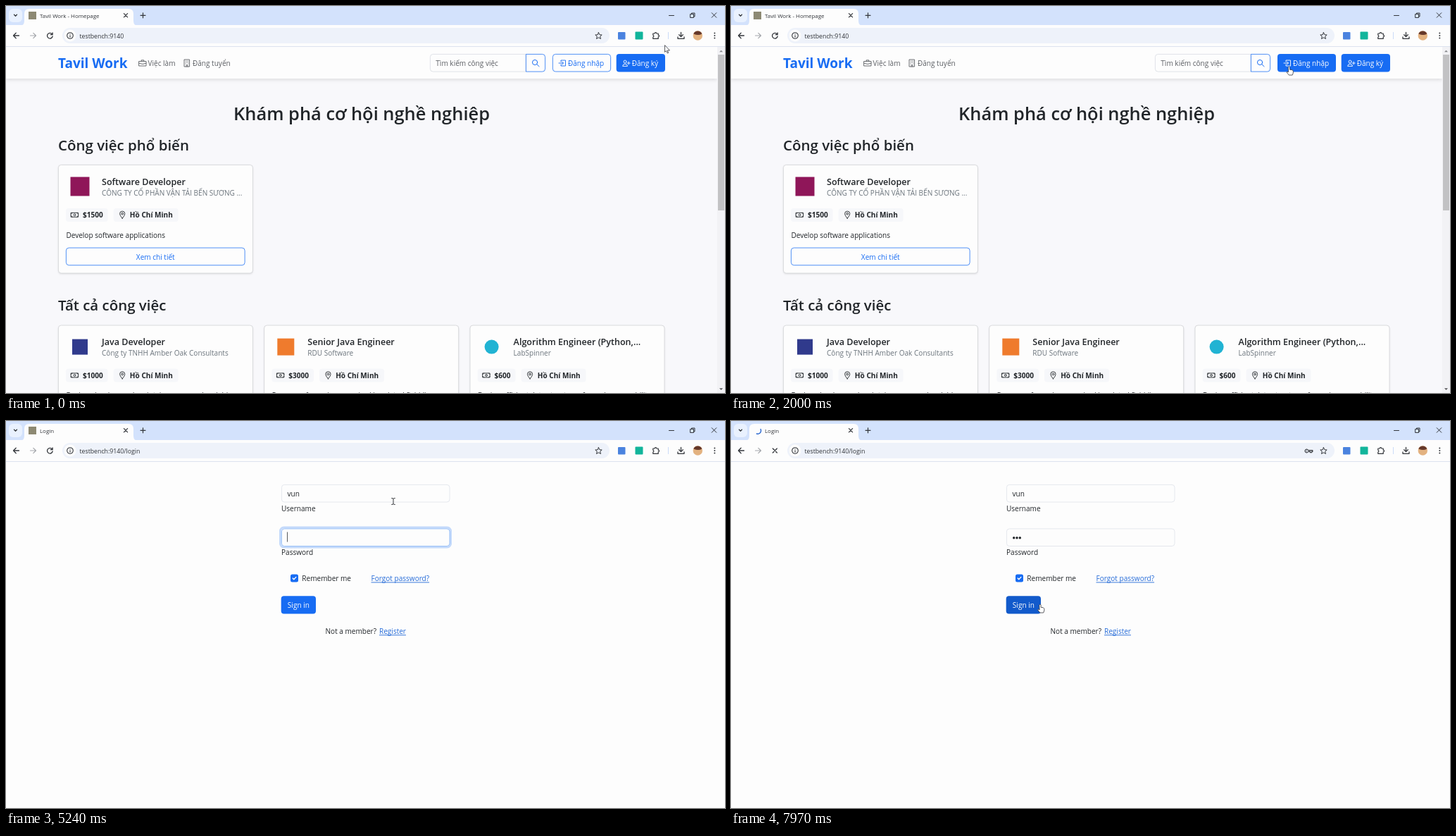
Recreate the animation shown at these times as an HTML page with a canvas. Size 1021x549 px, loop 8 s.

```html
<!DOCTYPE html>
<html lang="vi">
<head>
<meta charset="utf-8">
<title>Job board</title>
<style>
html, body { margin: 0; width: 100%; height: 100%; overflow: hidden; background: #fdfdfd; }
canvas { display: block; width: 1021px; height: 549px; }
</style>
</head>
<body>
<canvas id="stage" width="1021" height="549"></canvas>
<script>
const ctx = document.getElementById('stage').getContext('2d');
const LOOP = 8000;
const INK = '#212529', GREY = '#6c757d', BLUE = '#176cf3', WHITE = '#fdfdfd', CHROME = '#33363b';
const BODY = 10.67, BTN_H = 25.4, HAIR = 0.75;
const FACE = '"Open Sans", "Noto Sans", sans-serif';
const BRAND = 'Tavil Work', HOST = 'testbench:9140', USER = 'vun';

// Key moments, in ms
const LOGIN_LOAD = 2350, FOCUS_USER = 3350, FOCUS_PASS = 4800, PRESS = 7720, SUBMIT = 7800;
const USER_KEYS = [3800, 4050, 4300];
const PASS_KEYS = [5750, 5950, 6150];
const POINTER = [
  [0, 935.5, 56], [120, 935.5, 56], [950, 679.5, 223], [1380, 679.5, 223],
  [1920, 792.5, 86], [2400, 792.5, 86], [2780, 551, 116], [3100, 551, 116],
  [3300, 550, 114], [6280, 550, 114], [6850, 439.5, 259], [7550, 439.5, 259], [7700, 439, 260]
];

function text(s, x, y, o = {}) {
  const { size = BODY, weight = 400, color = INK, align = 'left' } = o;
  ctx.font = `${weight} ${size * 0.942}px ${FACE}`;
  ctx.fillStyle = color;
  ctx.textAlign = align;
  ctx.fillText(s, x, y);
  return ctx.measureText(s).width;
}

function box(x, y, w, h, r, fill, line, width = HAIR) {
  ctx.beginPath();
  ctx.roundRect(x, y, w, h, r);
  if (fill) { ctx.fillStyle = fill; ctx.fill(); }
  if (line) { ctx.strokeStyle = line; ctx.lineWidth = width; ctx.stroke(); }
}

function disc(x, y, r, color) {
  ctx.beginPath();
  ctx.arc(x, y, r, 0, 7);
  ctx.fillStyle = color;
  ctx.fill();
}

// Path drawn around the point (x, y)
function icon(d, x, y, color, width = 1, fill) {
  const p = new Path2D(d);
  ctx.save();
  ctx.translate(x, y);
  ctx.lineJoin = ctx.lineCap = 'round';
  if (fill) { ctx.fillStyle = fill; ctx.fill(p); }
  if (width) { ctx.strokeStyle = color; ctx.lineWidth = width; ctx.stroke(p); }
  ctx.restore();
}

function shadowed(blur, dy, draw) {
  ctx.save();
  ctx.shadowColor = 'rgba(0,0,0,.11)';
  ctx.shadowBlur = blur;
  ctx.shadowOffsetY = dy;
  draw();
  ctx.restore();
}

const ICONS = {
  cross: 'M-2.6-2.6L2.6 2.6M2.6-2.6L-2.6 2.6',
  plus: 'M-3.5 0H3.5M0-3.5V3.5',
  back: 'M4 0H-4M-.3-3.7L-4 0L-.3 3.7',
  reload: 'M3.1-2A3.8 3.8 0 1 0 3.8.8M3.8-4V-1.3H1.1',
  star: 'M0-4.7L1.4-1.6L4.7-1.3L2.2.9L3 4.2L0 2.5L-3 4.2L-2.2.9L-4.7-1.3L-1.4-1.6Z',
  puzzle: 'M-4.2-3H-1.8A1.3 1.3 0 1 1 .8-3H3.2V-.8A1.3 1.3 0 1 1 3.2 1.8V4.4H-4.2V2A1.4 1.4 0 0 0-4.2-.7Z',
  download: 'M0-4.5V1.5M-2.8-1.2L0 1.6L2.8-1.2M-4.5 2V4.3H4.5V2',
  key: 'M-.8-.9A2.4 2.4 0 1 0-.8.9H2V2.2H4.2V.9H5.4V-.9ZM-3.2-.2V.2',
  briefcase: 'M-5-2.5H5V4H-5ZM-1.8-2.5V-4.2H1.8V-2.5M-5 .2L0 1.4L5 .2',
  building: 'M-3.6-5H3.6V5H-3.6ZM-1 5V2.8H1V5M-1.8-3V-2.8M0-3V-2.8M1.8-3V-2.8M-1.8-1V-.8M0-1V-.8M1.8-1V-.8M-1.8 1V1.2M1.8 1V1.2',
  search: 'M2.2-.8A3.6 3.6 0 1 1-5-.8A3.6 3.6 0 1 1 2.2-.8M1.3 1.8L4.6 5',
  enter: 'M-2-2V-4H4.5V4H-2V2M-5 0H1.5M-.6-2.1L1.5 0L-.6 2.1',
  addUser: 'M.4-2A2 2 0 1 1-3.6-2A2 2 0 1 1 .4-2M-5 4Q-4.8 1.2-1.6 1.2T1.8 4ZM3.5-2V2M1.5 0H5.5',
  cash: 'M-5-3H5V3H-5ZM1.4 0A1.4 1.4 0 1 1-1.4 0A1.4 1.4 0 1 1 1.4 0M-5-1.4L-3.4-3M5-1.4L3.4-3M-5 1.4L-3.4 3M5 1.4L3.4 3',
  pin: 'M0 5Q-3.6.8-3.6-1.6A3.6 3.6 0 0 1 3.6-1.6Q3.6.8 0 5ZM1.4-1.6A1.4 1.4 0 1 1-1.4-1.6A1.4 1.4 0 1 1 1.4-1.6',
  arrow: 'M0 0V9.4L2.2 7.5L3.8 11L5.2 10.4L3.7 7H6.6Z',
  hand: 'M-1.1.8Q0-.9 1.1.8V4.3Q5.3 4.2 5.8 6.2V9L4.7 12H-.2L-3.4 8Q-3.4 6.2-1.1 7.6Z',
  beam: 'M-2.3-4.5Q0-4.5 0-3.6Q0-4.5 2.3-4.5M0-3.6V3.6M-2.3 4.5Q0 4.5 0 3.6Q0 4.5 2.3 4.5'
};

function pointerAt(t) {
  const i = POINTER.findIndex(p => p[0] > t);
  if (i < 0) return POINTER[POINTER.length - 1].slice(1);
  const [t0, x0, y0] = POINTER[i - 1], [t1, x1, y1] = POINTER[i];
  const u = (t - t0) / (t1 - t0), k = u * u * (3 - 2 * u);
  return [x0 + (x1 - x0) * k, y0 + (y1 - y0) * k];
}

const inside = ([px, py], x, y, w, h) => px >= x && px <= x + w && py >= y && py <= y + h;
const typed = (keys, t) => keys.filter(k => k <= t).length;

function browser(t, login) {
  const loading = t >= SUBMIT;
  ctx.fillStyle = '#d3e2fc';
  ctx.fillRect(0, 0, 1021, 28);
  box(4, 4, 19, 19, 6, '#e9f1fe');
  icon('M-2-1L0 1L2-1', 13.5, 13.2, CHROME, 1.3);
  icon('M20 28Q26 28 26 21V11Q26 4 33 4H174Q181 4 181 11V21Q181 28 187 28Z', 0, 0, WHITE, 0, WHITE);
  if (loading) {
    const a = (t - SUBMIT) / 1000 * 6 - 1.6;
    ctx.beginPath();
    ctx.arc(38, 13.7, 4.6, a, a + 2.6);
    ctx.strokeStyle = '#1b5dcc';
    ctx.lineWidth = 1.3;
    ctx.stroke();
  } else {
    box(32, 8, 11, 11, 0, '#8d8973');
  }
  text(login ? 'Login' : BRAND + ' - Homepage', 48, 16.6, { size: 8.4, color: CHROME });
  icon(ICONS.cross, 170, 13.3, CHROME, 1.2);
  icon(ICONS.plus, 194.5, 13.3, CHROME, 1.2);
  icon('M-3.5 0H3.5', 945, 13.5, CHROME);
  icon('M-3-1.5H1.5V3.5H-3ZM-1.5-1.5V-3H3V2H1.5', 975, 13, CHROME);
  icon('M-3.3-3.3L3.3 3.3M3.3-3.3L-3.3 3.3', 1005.5, 13, CHROME);

  ctx.fillStyle = WHITE;
  ctx.fillRect(0, 27, 1021, 31);
  ctx.fillStyle = '#dce2ef';
  ctx.fillRect(0, 57, 1021, 1);
  icon(ICONS.back, 14.5, 42, CHROME, 1.3);
  icon('M-4 0H4M.3-3.7L4 0L.3 3.7', 38.5, 42, '#a6a8ad', 1.2);
  icon(loading ? 'M-3-3L3 3M3-3L-3 3' : ICONS.reload, 62.3, 42, CHROME, 1.3);
  box(80, 31, 777, 22, 11, '#eef2fa');
  disc(91, 42, 8.5, WHITE);
  icon('M4.3 0A4.3 4.3 0 1 1-4.3 0A4.3 4.3 0 1 1 4.3 0M0-.3V2.1M0-2.2V-2', 91, 42, CHROME, 1.1);
  text(HOST + (login ? '/login' : ''), 104.5, 45.7, { size: 9.3, color: CHROME });
  if (t >= PASS_KEYS[0]) icon(ICONS.key, 820.5, 42.5, CHROME, 1.1);
  icon(ICONS.star, 841.5, 42.3, CHROME);
  box(869, 37, 10.5, 10.5, 1, '#4b83df');
  box(893.5, 36.5, 11, 11, 1, '#12b59b');
  icon(ICONS.puzzle, 923, 42, CHROME, 1.2);
  ctx.fillStyle = '#cbdcf8';
  ctx.fillRect(940, 37, 1, 10);
  icon(ICONS.download, 958.5, 42, CHROME, 1.3);
  disc(982.3, 42, 6.7, '#e3b280');
  icon('M-6-2.5A6.5 6.5 0 0 1 6-2.5Q1 .5-6-2.5Z', 982.3, 42, '', 0, '#65382a');
  for (const dy of [-3.6, 0, 3.6]) disc(1006.3, 42 + dy, 1, CHROME);
}

function button(x, y, w, label, o) {
  const color = o.filled ? WHITE : BLUE;
  if (o.filled) box(x, y, w, BTN_H, 4, o.fill || BLUE);
  else box(x + HAIR / 2, y + HAIR / 2, w - HAIR, BTN_H - HAIR, 4, null, BLUE);
  if (o.icon) icon(ICONS[o.icon], x + 14, y + 13, color, .9);
  text(label, o.icon ? x + 22 : x + w / 2, y + 17, { color, align: o.icon ? 'left' : 'center' });
}

function card(x, y, job) {
  shadowed(3, 1.2, () => box(x + .4, y + .4, 276, 153.6, 4, WHITE));
  box(x + .4, y + .4, 276, 153.6, 4, null, '#cfd0d3');
  job.logo(x + 31, y + 31);
  text(job.title, x + 62, y + 28.5, { size: 13.33, weight: 600 });
  text(job.firm, x + 62, y + 43.8, { color: GREY });

  ctx.font = `700 ${BODY * .942}px ${FACE}`;
  const payW = ctx.measureText(job.pay).width + 31;
  box(x + 11, y + 62, payW, 19, 4, '#f6f7fa');
  icon(ICONS.cash, x + 23.5, y + 71.3, INK, .9);
  text(job.pay, x + 35, y + 75.2, { weight: 700 });
  const px = x + 19 + payW;
  box(px, y + 62, 92, 19, 4, '#f6f7fa');
  icon(ICONS.pin, px + 12.5, y + 71.3, INK, .9);
  text('Hồ Chí Minh', px + 23.2, y + 75.2, { weight: 700 });

  text(job.about, x + 11.4, y + 103.6);
  button(x + 11, y + 117.7, 254.5, 'Xem chi tiết', {});
}

const square = (side, color) => (x, y) => box(x - side / 2, y - side / 2, side, side, 0, color);
const circle = (r, color) => (x, y) => disc(x, y, r, color);
const POPULAR = {
  title: 'Software Developer', firm: 'CÔNG TY CỔ PHẦN VẬN TẢI BẾN SƯƠNG ...', pay: '$1500',
  about: 'Develop software applications', logo: square(27, '#8f1659')
};
const JOBS = [
  { title: 'Java Developer', firm: 'Công ty TNHH Amber Oak Consultants', pay: '$1000',
    about: 'Design, develop, and maintain secure and scalable', logo: square(22, '#303a8c') },
  { title: 'Senior Java Engineer', firm: 'RDU Software', pay: '$3000',
    about: 'Programs for various required in related field (i.e', logo: square(24, '#ef7b2d') },
  { title: 'Algorithm Engineer (Python,...', firm: 'LabSpinner', pay: '$600',
    about: 'Design efficient data structures for various capability', logo: circle(10, '#21b3d3') }
];

function home(mouse) {
  ctx.fillStyle = '#f8f8fb';
  ctx.fillRect(0, 58, 1021, 491);
  shadowed(5, 2, () => { ctx.fillStyle = WHITE; ctx.fillRect(0, 58, 1010, 45); });
  text(BRAND, 74, 88, { size: 20.2, weight: 700, color: BLUE });
  const nav = { color: '#5c5f64' };
  icon(ICONS.briefcase, 194, 81, nav.color, .9);
  text('Việc làm', 201.5, 85.2, nav);
  icon(ICONS.building, 257, 81, nav.color, .9);
  text('Đăng tuyển', 265, 85.2, nav);
  box(602.4, 68.4, 136, 24.7, [4, 0, 0, 4], WHITE, '#d6dae0');
  text('Tìm kiếm công việc', 610.3, 85.2, nav);
  box(738.4, 68.4, 27.2, 24.7, [0, 4, 4, 0], null, BLUE);
  icon(ICONS.search, 752.5, 80.8, BLUE);
  const hover = inside(mouse, 776, 68, 83, BTN_H);
  button(776, 68, 83, 'Đăng nhập', { icon: 'enter', filled: hover });
  button(866.7, 68, 69.3, 'Đăng ký', { icon: 'addUser', filled: true });

  text('Khám phá cơ hội nghề nghiệp', 505, 161.7, { size: 27, weight: 600, align: 'center' });
  text('Công việc phổ biến', 74, 204.8, { size: 21.75, weight: 600 });
  card(74, 225, POPULAR);
  text('Tất cả công việc', 74, 432.3, { size: 21.75, weight: 600 });
  JOBS.forEach((job, i) => card(74 + i * 292.3, 452.6, job));

  ctx.fillStyle = '#f2f2f5';
  ctx.fillRect(1010, 58, 11, 491);
  ctx.fillStyle = '#c2c2c4';
  ctx.fillRect(1011, 69, 9, 221);
  icon('M-2.5 1.3L0-1.3L2.5 1.3Z', 1015.5, 64, '', 0, '#85868a');
  icon('M-2.5-1.3L0 1.3L2.5-1.3Z', 1015.5, 543.5, '', 0, '#505154');
  return hover ? 'hand' : 'arrow';
}

function field(y, label, value, focused, caret) {
  if (focused) box(389.5, y - 1.5, 242, 28, 5, null, '#c4dafb', 3);
  box(391.4, y + .4, 238.6, 24.6, 4, WHITE, focused ? '#7fb0f6' : '#dce0e8');
  let end = 399.5;
  if (value[0] === '•') {
    for (const _ of value) { disc(end + 2.2, y + 13.3, 1.7, INK); end += 4.3; }
  } else {
    end += text(value, end, y + 17);
  }
  if (focused && caret) {
    ctx.fillStyle = INK;
    ctx.fillRect(Math.floor(end), y + 5, HAIR, 14);
  }
  text(label, 391, y + 37.7);
}

function link(s, x, y) {
  const w = text(s, x, y, { color: '#256bd8' });
  ctx.fillStyle = '#256bd8';
  ctx.fillRect(x, y + 1.3, w, .9);
}

function login(t, mouse) {
  ctx.fillStyle = WHITE;
  ctx.fillRect(0, 58, 1021, 491);
  const last = Math.max(...[FOCUS_USER, FOCUS_PASS, ...USER_KEYS, ...PASS_KEYS].filter(k => k <= t));
  const caret = (t - last) % 1060 < 530;
  const inUser = t >= FOCUS_USER && t < FOCUS_PASS;
  const inPass = t >= FOCUS_PASS && t < PRESS;
  field(90, 'Username', USER.slice(0, typed(USER_KEYS, t)), inUser, caret);
  field(152.5, 'Password', '•'.repeat(typed(PASS_KEYS, t)), inPass, caret);
  box(404, 217.5, 11, 11, 2.5, BLUE);
  icon('M-2.3.1L-.7 1.8L2.4-1.6', 409.5, 223, WHITE, 1.4);
  text('Remember me', 420.3, 227.2);
  link('Forgot password?', 518.5, 227.2);
  const hover = inside(mouse, 391, 248, 49, BTN_H);
  const fill = t >= PRESS ? '#125acb' : hover ? '#1562dd' : BLUE;
  button(390.7, 248.2, 49.3, 'Sign in', { filled: true, fill });
  text('Not a member?', 453.5, 302);
  link('Register', 530, 302);
  if (hover || inside(mouse, 518, 217, 84, 13)) return 'hand';
  const overField = [89, 152].some(y => inside(mouse, 391, y, 239, 28));
  return overField ? 'beam' : 'arrow';
}

function frame(now) {
  const t = now % LOOP, mouse = pointerAt(t), onLogin = t >= LOGIN_LOAD;
  const shape = onLogin ? login(t, mouse) : home(mouse);
  browser(t, onLogin);
  const isBeam = shape === 'beam';
  icon(ICONS[shape], mouse[0], mouse[1], '#35373b', isBeam ? 1 : .8, isBeam ? null : '#fff');
  requestAnimationFrame(frame);
}
requestAnimationFrame(frame);
</script>
</body>
</html>
```
